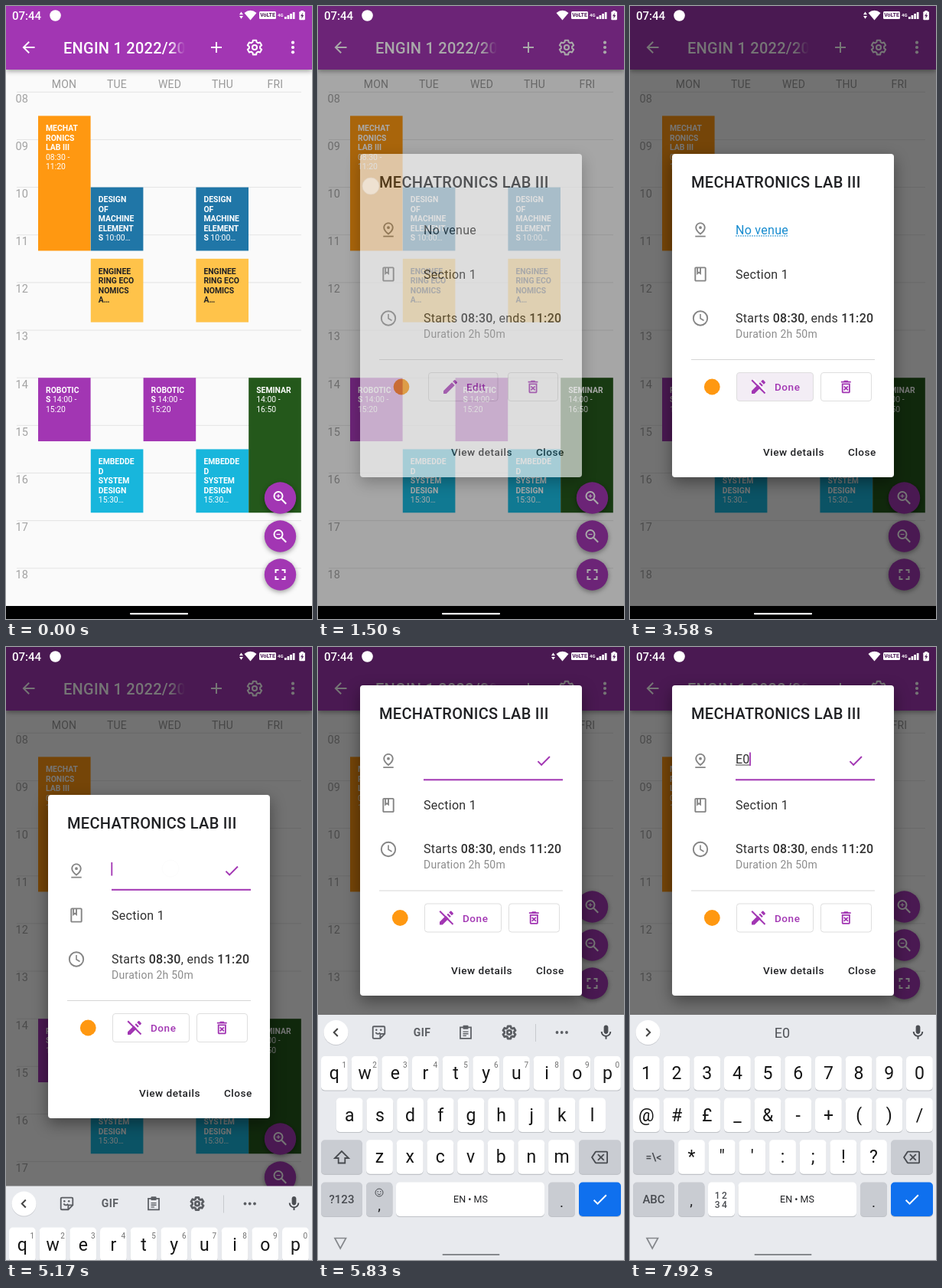
Write an HTML page that moves like this. It is 400 by 800 pixels and loops after 8 s.

```html
<!DOCTYPE html>
<html lang="en">
<head>
<meta charset="utf-8">
<title>Timetable</title>
<style>
html, body { margin: 0; width: 100%; height: 100%; overflow: hidden; background: #fafafa; }
svg { display: block; width: 100%; height: 100%; font-family: Roboto, "Noto Sans", sans-serif; }
text { white-space: pre; }
.lift { filter: drop-shadow(0 2px 3px rgba(0, 0, 0, .38)); }
.card { filter: drop-shadow(0 7px 10px rgba(0, 0, 0, .4)); }
</style>
</head>
<body>
<svg id="stage" viewBox="0 0 400 800"></svg>
<script>
const PURPLE = '#a236b3', ORANGE = '#ff9811', GREY = '#858585', INK = '#202124';
const LOOP = 8000, HOUR = 62.15, DAY0 = 112.3;

const ICONS = {
  back: 'M20 11H7.8l5.6-5.6L12 4l-8 8 8 8 1.4-1.4L7.8 13H20z',
  plus: 'M19 13h-6v6h-2v-6H5v-2h6V5h2v6h6z',
  full: 'M7 14H5v5h5v-2H7zM5 10h2V7h3V5H5zM17 17h-3v2h5v-5h-2zM14 5v2h3v3h2V5z',
  pin: 'M12 4c1.9 0 5 1.4 5 5.15 0 2.16-1.7 4.67-5 7.3-3.3-2.6-5-5.1-5-7.3C7 5.4 10.1 4 12 4M12 2C8.7 2 5 4.5 5 9.15c0 3.1 2.3 6.4 7 9.85 4.7-3.4 7-6.7 7-9.85C19 4.5 15.3 2 12 2zM12 7a2 2 0 1 0 0 4a2 2 0 0 0 0-4zM5 20h14v2H5z',
  book: 'M18 2H6c-1.1 0-2 .9-2 2v16c0 1.1.9 2 2 2h12c1.1 0 2-.9 2-2V4c0-1.1-.9-2-2-2zM9 4h2v5l-1-.75L9 9zM18 20H6V4h1v9l3-2.25L13 13V4h5z',
  pencil: 'M3 17.25V21h3.75L17.8 9.94l-3.75-3.75zM20.7 7.04c.4-.4.4-1 0-1.4l-2.3-2.35c-.4-.4-1-.4-1.4 0l-1.85 1.83 3.75 3.75z',
  trash: 'M14.1 10.5L12 12.6l-2.1-2.1-1.4 1.4 2.1 2.1-2.1 2.1 1.4 1.4 2.1-2.1 2.1 2.1 1.4-1.4-2.1-2.1 2.1-2.1zM15.5 4l-1-1h-5l-1 1H5v2h14V4zM6 19c0 1.1.9 2 2 2h8c1.1 0 2-.9 2-2V7H6zM8 9h8v10H8z',
  check: 'M9 16.2L4.8 12l-1.4 1.4L9 19 21 7l-1.4-1.4z',
  erase: 'M22 3H7c-.7 0-1.2.35-1.6.9L0 12l5.4 8.1c.4.5.9.9 1.6.9h15c1.1 0 2-.9 2-2V5c0-1.1-.9-2-2-2zM22 19H7.1L2.4 12l4.7-7H22zM10.4 17L14 13.4 17.6 17l1.4-1.4-3.6-3.6L19 8.4 17.6 7 14 10.6 10.4 7 9 8.4l3.6 3.6L9 15.6z',
  mic: 'M12 14c1.7 0 3-1.3 3-3V5c0-1.7-1.3-3-3-3S9 3.3 9 5v6c0 1.7 1.3 3 3 3zM17 11c0 2.8-2.2 5-5 5s-5-2.2-5-5H5c0 3.5 2.6 6.4 6 6.9V21h2v-3.1c3.4-.5 6-3.4 6-6.9z'
};

const esc = s => s.replace(/&/g, '&amp;').replace(/</g, '&lt;');
const rect = (x, y, w, h, fill, r = 0, more = '') =>
  `<rect x="${x}" y="${y}" width="${w}" height="${h}" rx="${r}" fill="${fill}" ${more}/>`;
const circle = (x, y, r, fill, more = '') => `<circle cx="${x}" cy="${y}" r="${r}" fill="${fill}" ${more}/>`;
const line = (d, color, width = 1, more = '') =>
  `<path d="${d}" fill="none" stroke="${color}" stroke-width="${width}" ${more}/>`;
const group = (id, body, more = '') => `<g id="${id}" ${more}>${body}</g>`;

// y is the optical centre of the capitals
const raw = (x, y, size, body, fill, weight = 400, space = 0, anchor = 'start') =>
  `<text x="${x}" y="${y + size * .356}" font-size="${size}" fill="${fill}" font-weight="${weight}" letter-spacing="${space}" text-anchor="${anchor}">${body}</text>`;
const text = (x, y, size, str, ...style) => raw(x, y, size, esc(str), ...style);
const mid = (x, y, size, str, fill, weight = 400, space = 0) => text(x, y, size, str, fill, weight, space, 'middle');

// places 24-unit artwork around a centre
const place = (x, y, size, body) =>
  `<g transform="translate(${x - size / 2} ${y - size / 2}) scale(${size / 24})">${body}</g>`;
const icon = (name, x, y, size, fill) =>
  place(x, y, size, `<path fill-rule="evenodd" fill="${fill}" d="${ICONS[name]}"/>`);

function gear(x, y, size, color, width) {
  let d = '';
  for (let i = 0; i < 6; i++)
    for (const [off, r] of [[-21, 7], [-13, 9.2], [13, 9.2], [21, 7]]) {
      const a = (i * 60 + off) * Math.PI / 180;
      d += `${d ? 'L' : 'M'}${(12 + r * Math.sin(a)).toFixed(2)} ${(12 - r * Math.cos(a)).toFixed(2)}`;
    }
  return place(x, y, size, line(d + 'Z', color, width, 'stroke-linejoin="round"') +
    circle(12, 12, 2.9, 'none', `stroke="${color}" stroke-width="${width}"`));
}

// lines starting with "~" are regular weight; "|" splits bold from regular
function lesson(day, from, to, fill, lines, ink = '#fff') {
  const x = 42 + day * 68.8, y = DAY0 + (from - 8) * HOUR;
  let out = rect(x, y, 68.6, (to - from) * HOUR, fill);
  lines.forEach((l, i) => {
    const [bold, thin] = l[0] === '~' ? ['', l.slice(1)] : l.split('|');
    const body = esc(bold) + (thin ? `<tspan font-weight="400">${esc(thin)}</tspan>` : '');
    out += raw(x + 10, y + 16 + i * 12.5, 10.4, body, ink, 700);
  });
  return out;
}

function timetable() {
  let out = rect(0, 0, 400, 800, '#fafafa');
  for (let h = 8; h <= 18; h++) {
    const y = DAY0 + (h - 8) * HOUR;
    out += line(`M14 ${y}H386`, '#e4e4e4') +
      text(12.5, y + 8.2, 14.5, String(h).padStart(2, '0'), '#a3a3a3');
  }
  ['MON', 'TUE', 'WED', 'THU', 'FRI'].forEach((d, i) => {
    out += mid(76 + i * 69, 102.5, 14, d, '#999', 400, .2);
  });
  out += lesson(0, 8.5, 11.333, ORANGE, ['MECHAT', 'RONICS', 'LAB III', '~08:30 -', '~11:20']);
  for (const d of [1, 3])
    out += lesson(d, 10, 11.333, '#2076a7', ['DESIGN', 'OF', 'MACHINE', 'ELEMENT', 'S| 10:00…']) +
      lesson(d, 11.5, 12.833, '#ffc34a', ['ENGINEE', 'RING ECO', 'NOMICS', 'A…'], INK) +
      lesson(d, 15.5, 16.833, '#18b6dc', ['EMBEDDE', 'D', 'SYSTEM', 'DESIGN', '~15:30…']);
  for (const d of [0, 2])
    out += lesson(d, 14, 15.333, PURPLE, ['ROBOTIC', 'S| 14:00 -', '~15:20']);
  return out + lesson(4, 14, 16.833, '#24581b', ['SEMINAR', '~14:00 -', '~16:50']);
}

const header = () =>
  rect(0, 0, 400, 83, PURPLE, 0, 'class="lift"') +
  icon('back', 29.5, 54, 24, '#fff') +
  text(75, 54.5, 20, 'ENGIN 1 2022/20', 'url(#fade)', 500, .25) +
  icon('plus', 275, 54, 24, '#fff') + gear(325, 54, 25, '#fff', 2) +
  [47.7, 54, 60.3].map(y => circle(375, y, 2.1, '#fff')).join('');

function fabs() {
  const lens = sign => circle(9.5, 9.5, 5.5, 'none', 'stroke="#fff" stroke-width="2"') +
    line('M13.8 13.8L19.7 19.7', '#fff', 2.1) + line(sign, '#fff', 1.2);
  return [642, 692, 742].map(y => circle(358.5, y, 20.7, PURPLE, 'class="lift"')).join('') +
    place(358.5, 642, 24, lens('M7 9.5H12M9.5 7V12')) +
    place(358.5, 692, 24, lens('M7 9.5H12')) + icon('full', 358.5, 742, 24, '#fff');
}

function status() {
  const bars = [0, 1, 2, 3].map(i => rect(364 + i * 3.6, 14 - i * 2, 2.7, 3 + i * 2, '#fff')).join('');
  return text(8, 12.5, 15, '07:44', '#fff', 500) + circle(64.5, 12.5, 7.3, '#fff') +
    group('arrows', '<path d="M305 11.2L307.5 7.5L310 11.2ZM305 13L307.5 16.7L310 13Z" fill="#fff"/>') +
    '<path d="M311.5 9Q319.5 2.5 327.5 9L319.5 18.5Z" fill="#fff"/>' +
    rect(331, 7, 22, 10, '#fff', 1.5) + mid(342, 12, 7, 'VoLTE', '#52205c', 700) +
    text(355, 12, 6, '4G', '#fff', 700) + bars +
    rect(385.4, 6, 3.4, 2, '#fff') + rect(383.3, 7.2, 7.6, 11, '#fff', 1) +
    '<path d="M388 8.8L385 13.2H386.9L386.2 16.7L389.2 12H387.4Z" fill="#52205c"/>';
}

function button(x, w, id = '') {
  return rect(x, 478.5, w, 37, '#fff', 3.5, `stroke="#dedede" ${id && `id="${id}"`}`);
}

function dialog() {
  const dark = '#303030';
  const body = text(80, 230, 20, 'MECHATRONICS LAB III', INK, 500, .3) +
    icon('pin', 92, 292, 23, GREY) + icon('book', 92, 350, 23, GREY) +
    place(92, 407.5, 24, circle(12, 12, 9.2, 'none', `stroke="${GREY}" stroke-width="1.9"`) +
      line('M12 6.6V12.2L16.5 15', GREY, 1.6)) +
    group('plain', text(138, 292, 16, 'No venue', dark, 400, .28)) +
    group('link', text(138, 292, 16, 'No venue', '#168bcf', 400, .28) +
      line('M138 300H207', '#168bcf', 1, 'stroke-dasharray="2 1"')) +
    group('field', group('typed', '') +
      rect(0, 281, 1.8, 17.5, PURPLE, 0, 'id="caret"') +
      icon('check', 295, 292, 23, PURPLE) + rect(138, 315.8, 182, 2, PURPLE)) +
    text(138, 350, 16, 'Section 1', dark, 400, .28) +
    raw(138, 407, 16, 'Starts <tspan font-weight="500">08:30</tspan>, ends <tspan font-weight="500">11:20</tspan>', dark, 400, .28) +
    text(138, 428, 14, 'Duration 2h 50m', '#8c8c8c', 400, .25) +
    line('M80 461.5H320', '#d6d6d6') +
    group('view', circle(109, 497, 10.4, ORANGE) + button(144.5, 90.5, 'editBox') +
      icon('pencil', 173, 497, 24, PURPLE) + text(194, 497.5, 13.5, 'Edit', PURPLE, 500, .55) +
      button(248.5, 65) + icon('trash', 281, 497, 22, PURPLE)) +
    group('edit', circle(107.3, 497, 10.4, ORANGE) + button(139.5, 100, 'doneBox') +
      icon('pencil', 168, 497, 24, PURPLE) +
      line('M161.5 487.2L178 503.7', '#fff', 2) + line('M159.2 488.2L176.5 505.5', PURPLE, 2) +
      text(189, 497.5, 13.5, 'Done', PURPLE, 500, .55) +
      button(249.5, 66) + icon('trash', 282.3, 497, 22, PURPLE));
  return rect(55, 193, 290, 422, '#fff', 4, 'id="sheet" class="card"') + group('content', body) +
    group('actions', text(174, 582.5, 13.6, 'View details', INK, 500, .5) +
      text(285, 582.5, 13.6, 'Close', INK, 500, .5));
}

const key = (x, y, w, fill = '#fff') =>
  rect(x, y + 1.2, w, 44.4, '#bfc2c7', 5) + rect(x, y, w, 44.4, fill, 5);

function row(chars, x0, y, digits) {
  return [...chars].map((c, i) => {
    const x = x0 + i * 39.67;
    return key(x - 17.4, y, 34.8) + mid(x, y + 22, 23, c, '#151515') +
      (digits ? mid(x + 13, y + 11, 10, String((i + 1) % 10), '#707070') : '');
  }).join('');
}

function page(rows, symbols, shifted) {
  const soft = '#c9ccd2', ink = '#484b50';
  let out = row(rows[0], 21.4, 534, !symbols) + row(rows[1], symbols ? 21.4 : 41.2, 588.5) +
    row(rows[2], 80.5, 643.3);
  out += key(4, 643.3, 54, soft) + key(341, 643.3, 55, soft) + icon('erase', 368, 666, 22, ink) +
    key(4, 698.5, 54, soft) + key(63, 698.5, 34.5, soft) + key(301, 698.5, 35, soft) +
    key(341, 698.5, 55, '#0f70ee') + icon('check', 368.5, 721, 24, '#fff') +
    mid(318.5, 724, 19, '.', INK);
  if (symbols)
    out += mid(31, 666, 14, '=\\<', ink, 500) + mid(31, 721, 15, 'ABC', ink, 500) +
      mid(80, 722, 19, ',', INK) + key(102, 698.5, 35) +
      mid(120, 715.5, 12, '12', ink, 500, 2.5) + mid(120, 727.5, 12, '34', ink, 500, 2.5) +
      key(141.5, 698.5, 154.5) + mid(218.5, 721, 12.5, 'EN • MS', INK);
  else
    out += place(31, 666, 24, `<path d="M12 4L3 13H7.7V19.5H16.3V13H21Z" fill="${shifted ? ink : 'none'}" stroke="${ink}" stroke-width="1.8"/>`) +
      mid(31, 721, 15, '?123', ink, 500) +
      circle(80, 712, 5, 'none', `stroke="${ink}"`) + line('M77.5 713Q80 716.2 82.5 713', ink) +
      circle(78.2, 710.7, .8, ink) + circle(81.8, 710.7, .8, ink) +
      mid(80, 728, 19, ',', INK) + key(102, 698.5, 194) + mid(199.5, 721, 12.5, 'EN • MS', INK);
  return out;
}

function keyboard() {
  const ink = '#5b5e63', letters = ['qwertyuiop', 'asdfghjkl', 'zxcvbnm'];
  const knob = d => circle(23.5, 504, 16, '#c9cbd0') + circle(23.5, 503, 16, '#fff') + line(d, '#444', 2);
  const tools = knob('M25.8 498L20.8 503L25.8 508') +
    place(79.5, 503, 22, line('M5 3.5H19Q20.5 3.5 20.5 5V14L14 20.5H5Q3.5 20.5 3.5 19V5Q3.5 3.5 5 3.5ZM20.5 14H15.5Q14 14 14 15.5V20.5M7.5 12Q10 16 14 12.5', ink, 2) +
      circle(8.5, 8.5, 1.4, ink) + circle(15, 8.5, 1.4, ink)) +
    mid(136, 503, 14, 'GIF', ink, 700, .4) +
    place(193, 503, 21, line('M4 4.5H20V21H4Z', ink, 2) + rect(8, 1.5, 8, 5.5, ink, 1) +
      line('M8 11H16M8 14H16M8 17H13', ink, 1.6)) +
    gear(250, 503, 22, ink, 3) + line('M284.5 492V515', '#c7cace') +
    [312.5, 318.7, 325].map(x => circle(x, 503, 1.9, ink)).join('');
  const hints = knob('M21.2 498L26.2 503L21.2 508') + group('hint', '');
  return rect(0, 480, 400, 320, '#e8eaee') + group('tools', tools) + group('hints', hints) +
    icon('mic', 376.5, 503, 23, '#4b4e53') +
    group('lower', page(letters)) +
    group('upper', page(letters.map(r => r.toUpperCase()), false, true)) +
    group('symbols', page(['1234567890', '@#£_&-+()/', '*"\':;!?'], true)) +
    line('M22 771.5H36.5L29.2 785Z', '#85888c', 1.7) + rect(162.5, 792, 75, 2, '#85888c', 1);
}

const stage = document.getElementById('stage');
stage.innerHTML = `<defs><linearGradient id="fade" gradientUnits="userSpaceOnUse" x1="213" x2="234" y1="0" y2="0">
  <stop stop-color="#fff"/><stop offset="1" stop-color="#fff" stop-opacity="0"/></linearGradient></defs>` +
  timetable() + group('fabs', fabs()) + header() +
  rect(0, 0, 400, 800, '#000', 0, 'id="shade"') +
  group('dialog', dialog()) + status() +
  rect(0, 783, 400, 17, '#000') + rect(162, 792, 76, 2.2, '#fff', 1) +
  group('keyboard', keyboard()) + group('popup', '') +
  circle(0, 0, 11, '#fff', 'id="touch" stroke="#ddd" stroke-width=".7"');

const el = {};
stage.querySelectorAll('[id]').forEach(n => { el[n.id] = n; });

const clamp = v => Math.max(0, Math.min(1, v));
const ramp = (t, from, to) => clamp((t - from) / (to - from));
const easeOut = p => 1 - (1 - p) ** 2;
const show = (node, on) => node.setAttribute('display', on ? 'inline' : 'none');
const shift = (node, y) => node.setAttribute('transform', `translate(0 ${y.toFixed(2)})`);

// x, y, press, release
const TAPS = [
  [69, 235, 1240, 1460], [188, 497, 3210, 3380], [215, 289, 4860, 5030],
  [31, 666, 5880, 6030], [100, 556, 6530, 6640], [31, 721, 7030, 7140], [378, 556, 7530, 7640]
];

function render(t) {
  const typed = t < 6640 ? '' : t < 7640 ? 'E' : 'E0';
  const editing = t >= 3400, writing = t >= 5050;

  const fade = 1 - (1 - ramp(t, 1420, 1580)) ** 1.4;
  el.shade.setAttribute('opacity', .54 * fade);
  el.dialog.setAttribute('opacity', fade);
  show(el.arrows, t < 1000 || (t >= 3250 && t < 7080));

  const up = easeOut(ramp(t, 5330, 5490));
  el.sheet.setAttribute('y', 193 - 143 * up);
  el.sheet.setAttribute('height', 422 - 17 * up);
  shift(el.content, -143.5 * up);
  shift(el.actions, -160 * up);
  shift(el.fabs, t >= 5330 ? -303 : 0);

  show(el.view, !editing);
  show(el.edit, editing);
  show(el.plain, !editing);
  show(el.link, editing && !writing);
  show(el.field, writing);
  el.editBox.setAttribute('fill', t > 3230 ? '#f3ecf5' : '#fff');
  el.doneBox.setAttribute('fill', t < 3700 ? '#f3edf5' : '#fff');

  const focus = t < 6640 ? 5080 : t < 7640 ? 6640 : 7640;
  const width = [0, 9.4, 18.7][typed.length];
  show(el.caret, Math.floor(Math.max(0, t - focus) / 500) % 2 === 0);
  el.caret.setAttribute('x', 137.4 + width);
  el.typed.innerHTML = typed &&
    text(138, 289.5, 16, typed, '#303030', 400, .28) + line(`M138 297.5h${width}`, '#444');

  shift(el.keyboard, 320 * (1 - easeOut(ramp(t, 5125, 5405))));
  show(el.tools, !typed);
  show(el.hints, typed);
  el.hint.innerHTML = mid(199, 504, 18, typed, '#505358', 400, .2);
  const caps = t >= 6030 && t < 6640, symbols = t >= 7140;
  show(el.lower, !caps && !symbols);
  show(el.upper, caps);
  show(el.symbols, symbols);

  const pop = t >= 6530 && t < 6680 ? ['E', 100.7] : t >= 7530 && t < 7680 ? ['0', 378] : null;
  el.popup.innerHTML = pop
    ? rect(pop[1] - 20, 484, 40, 47, '#fff', 6, 'class="lift"') + mid(pop[1], 507, 26, pop[0], '#151515') : '';

  const tap = TAPS.find(([, , a, b]) => t >= a && t < b + 170);
  show(el.touch, tap);
  if (tap) {
    const [x, y, a, b] = tap;
    el.touch.setAttribute('cx', x);
    el.touch.setAttribute('cy', y);
    el.touch.setAttribute('opacity', .65 * ramp(t, a - 40, a + 40) * (1 - ramp(t, b, b + 170)));
  }
}

function tick() {
  render(performance.now() % LOOP);
  requestAnimationFrame(tick);
}
tick();
</script>
</body>
</html>
```
